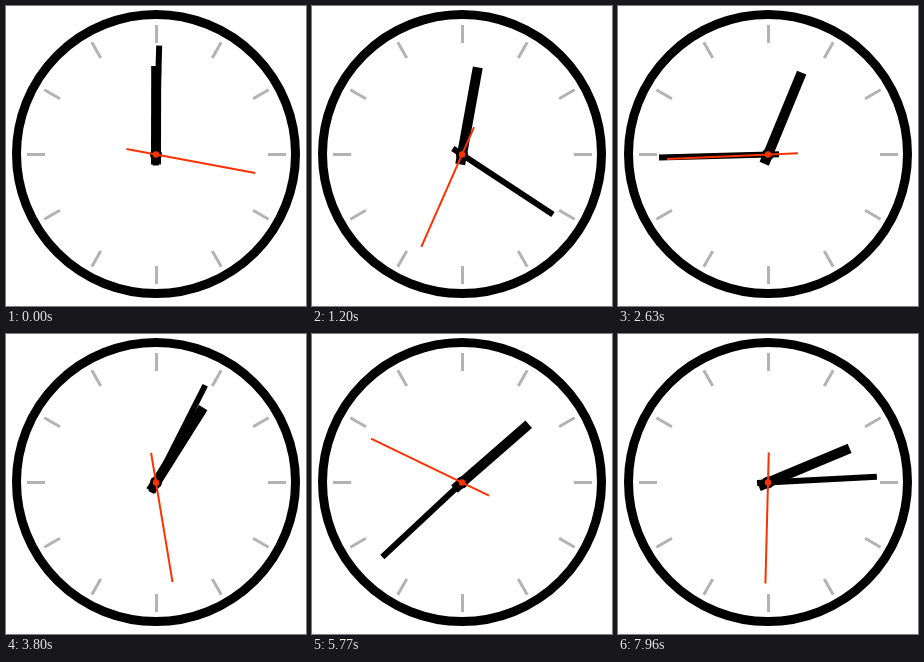
An HTML page with a canvas that plays this animation: 300 by 300 pixels, repeating every 7990 ms.

```html
<!DOCTYPE html>
<html lang="en">
<head>
<meta charset="utf-8">
<title>Clock</title>
<style>
  html, body { margin: 0; width: 100%; height: 100%; overflow: hidden; background: #fff; }
  canvas { display: block; width: 300px; height: 300px; }
</style>
</head>
<body>
<canvas id="clock" width="300" height="300"></canvas>
<script>
const ctx = document.getElementById('clock').getContext('2d');
const RAD = Math.PI / 180;
const CX = 150, CY = 148.5;
const RED = '#fa3200';

// The clock moves in steps: most last 50 ms (3 ticks), the ones listed 30 ms (2 ticks).
const STEPS = 173;
const SHORT = new Set([
  2, 7, 13, 18, 23, 29, 34, 40, 45, 50, 56, 61, 67, 72, 78, 83, 88,
  93, 99, 104, 108, 113, 119, 124, 130, 136, 142, 147, 152, 156, 161, 167, 172
]);
const START_ANGLE = 100.6;   // second hand, degrees
const TICK_ANGLE = 100.0432; // second hand, degrees per tick

const steps = [];
let loopLength = 0;
for (let i = 0, ticks = 0; i < STEPS; i++) {
  const short = SHORT.has(i);
  if (i > 0) ticks += short ? 2 : 3;
  steps.push({ start: loopLength, ticks });
  loopLength += short ? 30 : 50;
}

function ticksAt(time) {
  let i = STEPS - 1;
  while (i > 0 && steps[i].start > time) i--;
  return steps[i].ticks;
}

// A radial bar; angle 0 points up and grows clockwise.
function bar(x, y, angle, from, to, width, color) {
  ctx.save();
  ctx.translate(x, y);
  ctx.rotate(angle * RAD);
  ctx.fillStyle = color;
  ctx.fillRect(-width / 2, -to, width, to - from);
  ctx.restore();
}

function dot(radius, color) {
  ctx.fillStyle = color;
  ctx.beginPath();
  ctx.arc(CX, CY, radius, 0, 2 * Math.PI);
  ctx.fill();
}

function drawFace() {
  ctx.fillStyle = '#fff';
  ctx.fillRect(0, 0, 300, 300);
  ctx.strokeStyle = '#000';
  ctx.lineWidth = 9;
  ctx.beginPath();
  ctx.arc(150, 148, 139.5, 0, 2 * Math.PI);
  ctx.stroke();
  for (let hour = 0; hour < 12; hour++) {
    bar(150.5, 148.5, hour * 30, 111.5, 129.5, 3, '#b3b3b3');
  }
}

function draw(time) {
  const second = START_ANGLE + TICK_ANGLE * ticksAt(time);
  const minute = second / 60;
  drawFace();
  bar(CX, CY, minute / 12, -10, 88.5, 10, '#000');
  bar(CX, CY, minute, -11, 109, 6, '#000');
  dot(6, '#000');
  bar(CX, CY, second, -30, 101, 2, RED);
  dot(3.2, RED);
}

const origin = performance.now();
function loop() {
  draw((performance.now() - origin) % loopLength);
  requestAnimationFrame(loop);
}
loop();
</script>
</body>
</html>
```
